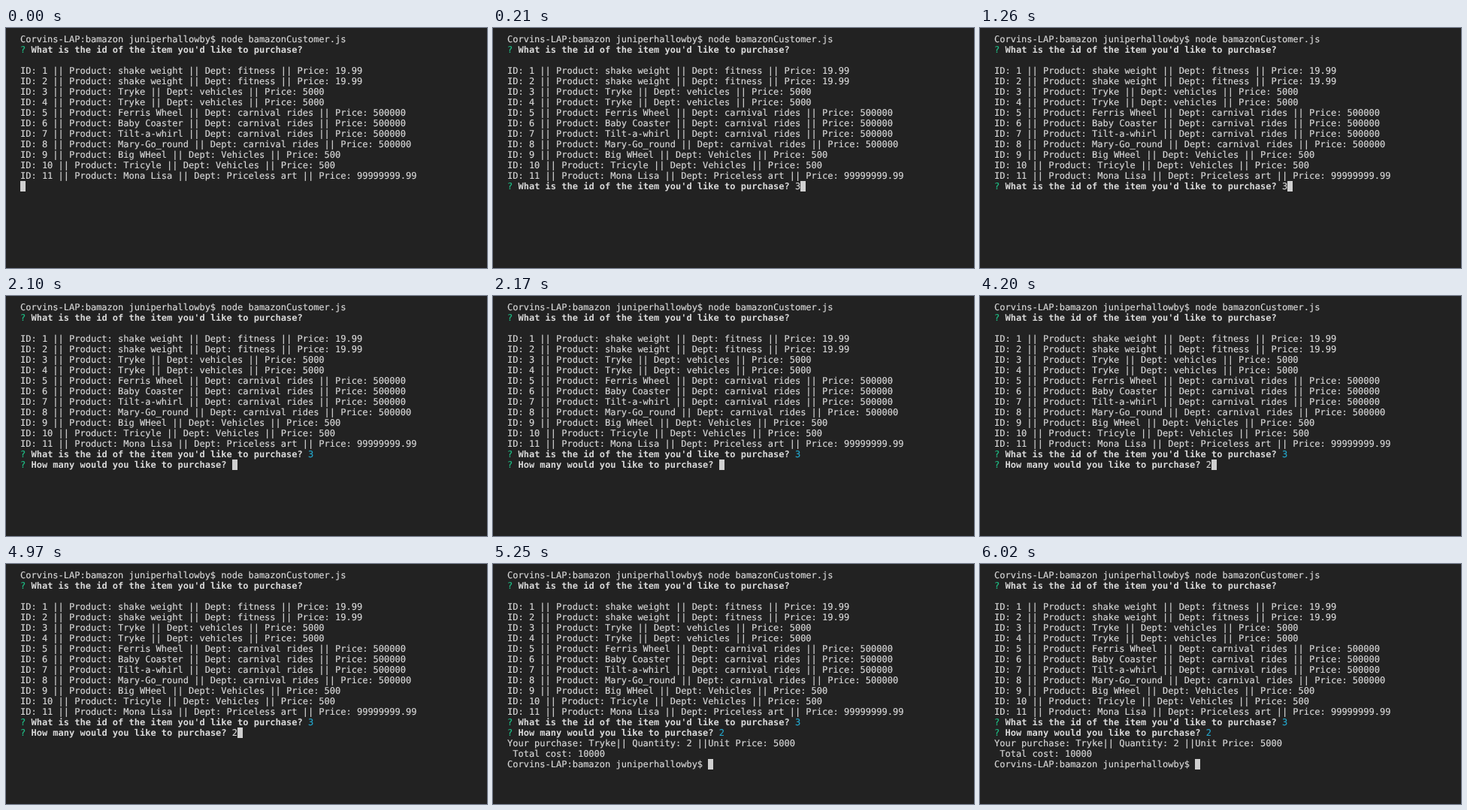
Write an HTML page that moves like this. It is 640 px wide and 320 px high and loops after 6090 ms.

```html
<!DOCTYPE html>
<html lang="en">
<head>
<meta charset="utf-8">
<title>Terminal shop</title>
<style>
  html, body { margin: 0; width: 100%; height: 100%; overflow: hidden; background: #222; }

  pre {
    --cell: 7.224px;
    --row: 14px;
    position: absolute; left: 19px; top: 8px; margin: 0;
    font: 12px/14px "DejaVu Sans Mono", "Liberation Mono", monospace;
    text-rendering: geometricPrecision;
    color: #dadada;
    -webkit-text-stroke: .15px;
  }
  b { -webkit-text-stroke: 0; }
  i { font-style: normal; color: #1fbc84; }

  .ask1, .key1, .ask2, .key2, .result, .cursor {
    animation: 6090ms step-end infinite;
  }
  .ask1   { animation-name: ask1; }
  .key1   { animation-name: key1; }
  .ask2   { animation-name: ask2; }
  .key2   { animation-name: key2; }
  .result { animation-name: result; }
  .cursor {
    --x: 0; --y: 14;
    position: absolute; width: 7px; height: 14px;
    left: calc(var(--x) * var(--cell));
    top: calc(var(--y) * var(--row));
    background: #d0d0d0;
    animation-name: cursor;
  }

  /* prompt 70 ms, first key 140, enter 2100, second key 3710, enter 5250 */
  @keyframes ask1   { 0% { visibility: hidden } 1.1494%, 100% { visibility: visible } }
  @keyframes key1   { 0% { visibility: hidden; color: #dadada }
                      2.2988% { visibility: visible; color: #dadada }
                      34.4827%, 100% { visibility: visible; color: #24a9cf } }
  @keyframes ask2   { 0% { visibility: hidden } 34.4827%, 100% { visibility: visible } }
  @keyframes key2   { 0% { visibility: hidden; color: #dadada }
                      60.9195% { visibility: visible; color: #dadada }
                      86.2068%, 100% { visibility: visible; color: #24a9cf } }
  @keyframes result { 0% { visibility: hidden } 86.2068%, 100% { visibility: visible } }
  @keyframes cursor {
    0%       { --x: 0;  --y: 14 }
    1.1494%  { --x: 53; --y: 14 }
    2.2988%  { --x: 54; --y: 14 }
    34.4827% { --x: 39; --y: 15 }
    60.9195% { --x: 40; --y: 15 }
    86.2068%, 100% { --x: 37; --y: 18 }
  }
</style>
</head>
<body>
<pre>Corvins-LAP:bamazon juniperhallowby$ node bamazonCustomer.js
<i>?</i> <b>What is the id of the item you'd like to purchase?</b>

ID: 1 || Product: shake weight || Dept: fitness || Price: 19.99
ID: 2 || Product: shake weight || Dept: fitness || Price: 19.99
ID: 3 || Product: Tryke || Dept: vehicles || Price: 5000
ID: 4 || Product: Tryke || Dept: vehicles || Price: 5000
ID: 5 || Product: Ferris Wheel || Dept: carnival rides || Price: 500000
ID: 6 || Product: Baby Coaster || Dept: carnival rides || Price: 500000
ID: 7 || Product: Tilt-a-whirl || Dept: carnival rides || Price: 500000
ID: 8 || Product: Mary-Go_round || Dept: carnival rides || Price: 500000
ID: 9 || Product: Big WHeel || Dept: Vehicles || Price: 500
ID: 10 || Product: Tricyle || Dept: Vehicles || Price: 500
ID: 11 || Product: Mona Lisa || Dept: Priceless art || Price: 99999999.99
<span class="ask1"><i>?</i> <b>What is the id of the item you'd like to purchase?</b> </span><span class="key1">3</span>
<span class="ask2"><i>?</i> <b>How many would you like to purchase?</b> </span><span class="key2">2</span>
<span class="result">Your purchase: Tryke|| Quantity: 2 ||Unit Price: 5000
 Total cost: 10000
Corvins-LAP:bamazon juniperhallowby$ </span><span class="cursor"></span></pre>
</body>
</html>
```
